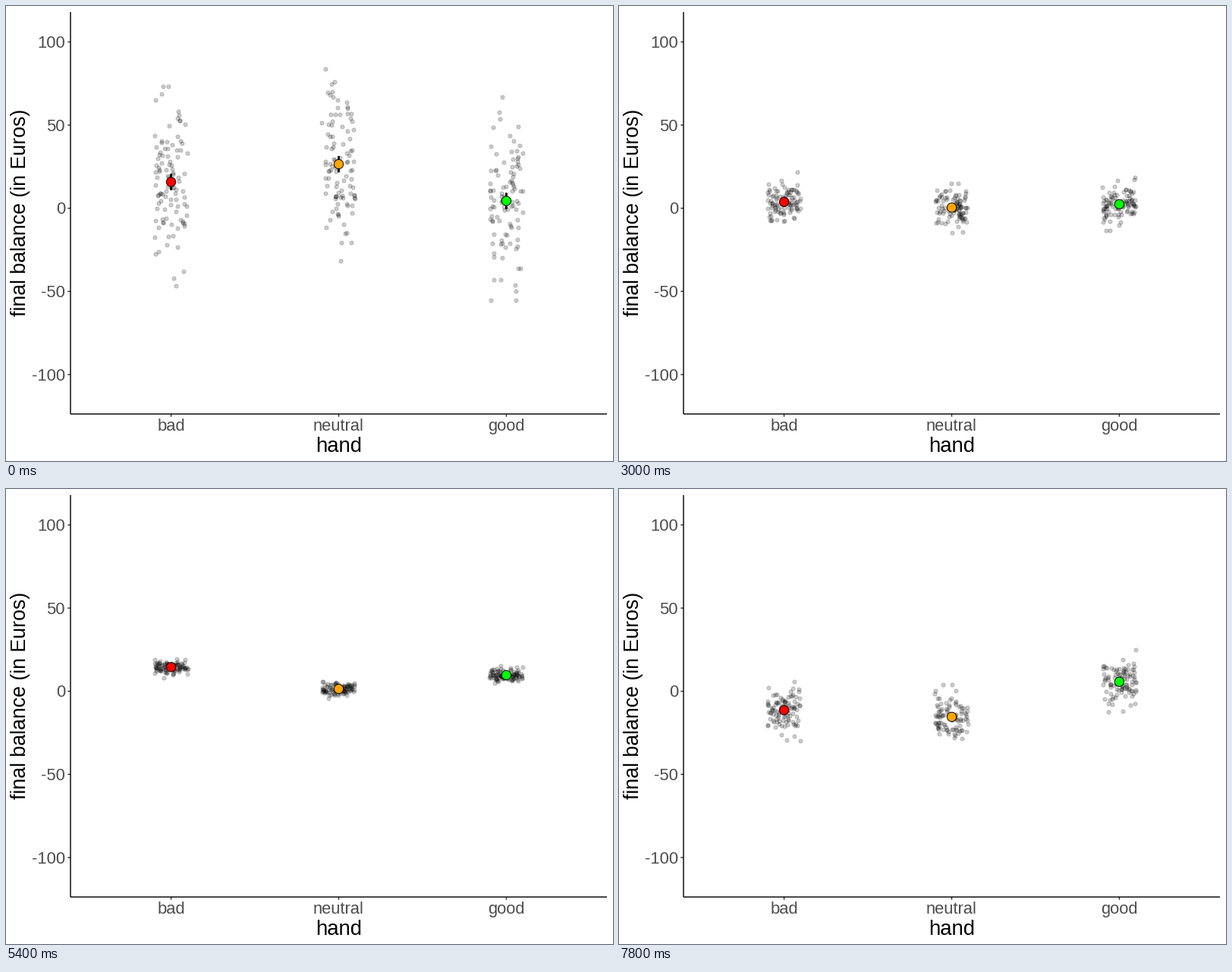
A matplotlib script for the animation above (8 s loop, 800 by 600 pixels).

```python
import numpy as np
import matplotlib.pyplot as plt
from matplotlib.animation import FuncAnimation

W, H, DPI = 800, 600, 100
PT = 72 / DPI                       # points per pixel
LEFT, RIGHT, TOP, BOTTOM = 85, 792, 8, 538
STEP = (RIGHT - LEFT) / 3.2         # distance between categories
JITTER = 0.1 * STEP
N = 100                             # dots per hand
STEP_MS, HOLD = 200, 3              # each sample stays for HOLD ticks
TICKS = 40

NAMES = ["bad", "neutral", "good"]
FILLS = ["#ff0000", "#ffa500", "#00ff00"]
CENTRES = LEFT + STEP * (0.6 + np.arange(3))

# spread of every sample, and key means that the others lie between
SPREADS = [25, 7, 5, 3, 6, 6, 17, 14.5, 5, 2.1, 41, 4.3, 5, 7]
KEYS = [0, 1, 3, 5, 7, 9, 11, 13]
MEANS = {
    "bad": [15.8, 2, 21.8, 3.8, -4.6, 14.5, -9.4, -11.4],
    "neutral": [26.5, -6, 15.8, 0.4, 6.5, 1.4, -26, -15.4],
    "good": [4.4, 6, 26.3, 2.4, -10.5, 9.7, -3.7, 5.7],
}


def to_y(value):
    return 266.7 - 2.193 * np.asarray(value)


def make_sample(k):
    """Jittered normal clouds, their means and 95 % intervals."""
    rng = np.random.default_rng(40 + k)
    means = np.array([np.interp(k, KEYS, MEANS[name]) for name in NAMES])
    z = rng.normal(size=(3, N)).clip(-2.7, 2.7)
    z = (z - z.mean(axis=1, keepdims=True)) / z.std(axis=1, keepdims=True)
    xs = CENTRES[:, None] + rng.uniform(-JITTER, JITTER, (3, N))
    ys = to_y(means[:, None] + SPREADS[k] * z)
    dots = np.column_stack([xs.ravel(), ys.ravel()])
    err = 1.96 * SPREADS[k] / np.sqrt(N)
    bars = [[(x, to_y(m - err)), (x, to_y(m + err))]
            for x, m in zip(CENTRES, means)]
    return dots, np.column_stack([CENTRES, to_y(means)]), bars


plt.rcParams["font.family"] = "Liberation Sans"
fig = plt.figure(figsize=(W / DPI, H / DPI), dpi=DPI, facecolor="white")
ax = fig.add_axes([0, 0, 1, 1])
ax.set_xlim(0, W)
ax.set_ylim(H, 0)
ax.axis("off")


def line(xs, ys, color):
    ax.plot(xs, ys, color=color, lw=1.42 * PT, solid_capstyle="butt", snap=False)


def label(x, y, text, px, color, **kw):
    ax.text(x, y, text, fontsize=px * PT, color=color, va="baseline", **kw)


# axes, ticks and labels
for value in range(-100, 101, 50):
    y = to_y(value)
    line([LEFT - 3.7, LEFT], [y, y], "#333333")
    label(78, y + 7.8, str(value), 22, "#4d4d4d", ha="right")
for x, name in zip(CENTRES, NAMES):
    line([x, x], [BOTTOM, BOTTOM + 3.7], "#333333")
    label(x, 560, name, 22, "#4d4d4d", ha="center")
line([LEFT, LEFT], [TOP, BOTTOM], "black")
line([LEFT, RIGHT], [BOTTOM, BOTTOM], "black")
label((LEFT + RIGHT) / 2, 588, "hand", 27.5, "black", ha="center")
label(26.5, 272, "final balance (in Euros)", 26.8, "black", ha="center",
      rotation=90, rotation_mode="anchor")

samples = [make_sample(k) for k in range(len(SPREADS))]
dots0, means0, bars0 = samples[0]
ghost = (0, 0, 0, 0.2)
dots = ax.scatter(*dots0.T, s=(5.2 * PT) ** 2, facecolor=[ghost],
                  edgecolor=[ghost], lw=0.95 * PT, zorder=3, snap=False)
bars = ax.vlines(CENTRES, 0, 1, color="black", lw=2.85 * PT, zorder=4)
bars.set_snap(False)
means = ax.scatter(*means0.T, s=(12.3 * PT) ** 2, c=FILLS, edgecolor="black",
                   lw=0.95 * PT, zorder=5, snap=False)


def update(tick):
    points, centres, segments = samples[tick // HOLD]
    dots.set_offsets(points)
    bars.set_segments(segments)
    means.set_offsets(centres)
    return dots, bars, means


update(0)
anim = FuncAnimation(fig, update, frames=TICKS, interval=STEP_MS,
                     repeat=True, repeat_delay=0)
plt.show()
```
